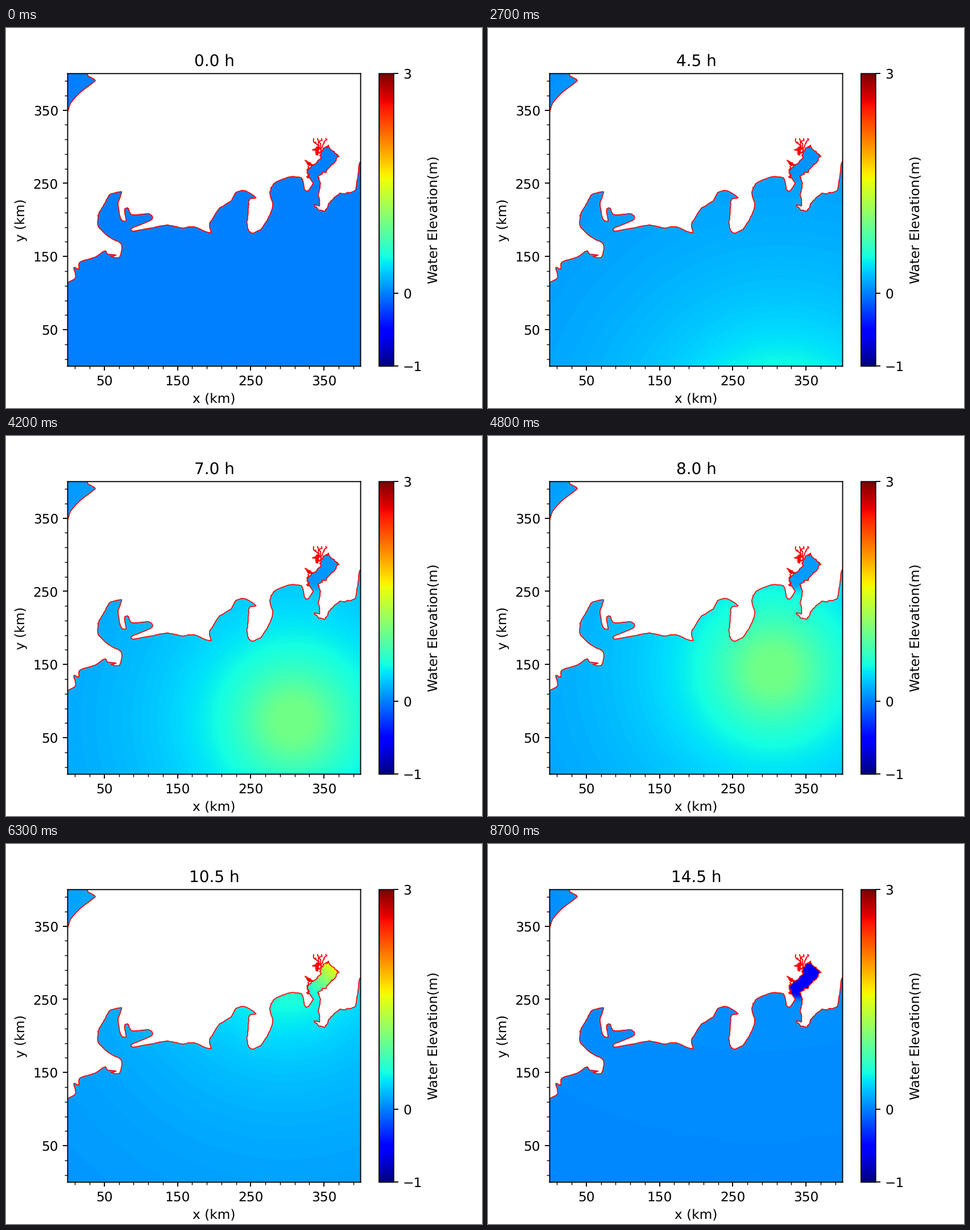
Animation of 837 by 669 pixels, one loop 9000 ms. Source, as a matplotlib script:

```python
import numpy as np
import matplotlib.pyplot as plt
from matplotlib.animation import FuncAnimation
from matplotlib.patches import Polygon
from matplotlib.ticker import AutoMinorLocator

W, H, DPI = 837, 669, 167.3
FRAMES, STEP_MS = 30, 300
plt.rcParams.update({"path.snap": False, "text.hinting": "none"})
rng = np.random.default_rng(4)

# Key points of the coast in stage pixels, joined by smooth curves
WEST = [(90, 457), (122, 440), (119, 422), (128, 424), (130, 412), (157, 403),
        (174, 392), (179, 398), (194, 400), (185, 402), (199, 404), (203, 381),
        (180, 367), (162, 349), (163, 327), (174, 308), (183, 293), (203, 289),
        (197, 310), (202, 336), (211, 340), (208, 320), (214, 317), (222, 329),
        (251, 327), (257, 337), (221, 353), (223, 358)]
MIDDLE = [(250, 353), (284, 347), (310, 352), (330, 350), (360, 361), (358, 346),
          (374, 319), (396, 304), (404, 290), (420, 286), (440, 299), (428, 302),
          (426, 320), (424, 344), (427, 357), (434, 361), (449, 353), (462, 333),
          (469, 313), (464, 290), (472, 273), (498, 262), (520, 264), (526, 286),
          (533, 285), (540, 273)]
BAY = [(532, 264), (532, 248), (551, 231), (556, 214), (567, 210), (584, 226),
       (572, 242), (549, 264)]
EAST = [(553, 274), (550, 292), (551, 312), (543, 312), (550, 320), (562, 321),
        (569, 307), (587, 292), (613, 287), (618, 265), (624, 234), (640, 215)]
CORNER = [(640, 60), (170, 76), (157, 93), (130, 114), (114, 132), (108, 149),
          (90, 200)]


def km(points):
    p = np.asarray(points, float)
    return np.column_stack([p[:, 0] - 108.45, 595.4 - p[:, 1]]) / 1.2878


def curve(points, rough=0, parts=6):
    """Spline through the points, roughened by random offsets."""
    p = np.asarray(points, float)
    ext = np.vstack([p[:1], p, p[-1:]])
    slope = 0.35 * (ext[2:] - ext[:-2])
    u = (np.arange(parts) / parts)[None, :, None]
    a, b = p[:-1, None], p[1:, None]
    s, e = slope[:-1, None], slope[1:, None]
    ease_u = u * u * (3 - 2 * u)
    line = a + (b - a) * ease_u + s * u * (1 - u) ** 2 - e * u * u * (1 - u)
    line = np.vstack([line.reshape(-1, 2), p[-1:]])
    return line + rng.normal(0, 1, line.shape) * rough


def creek(start, end, n=14):
    """A meandering stream between two points."""
    u = np.linspace(0, 1, n)[:, None]
    walk = rng.normal(0, 1.1, (n, 2)).cumsum(axis=0)
    return np.array(start) * (1 - u) + np.array(end) * u + walk - u * walk[-1]


def scribble(x, y, sx, sy, n=30):
    return rng.normal((x, y), (sx, sy), (n, 2))


land = np.vstack([curve(WEST, 0.25), curve(MIDDLE, 0.3), curve(BAY, 1.4, 9),
                  curve(EAST, 0.6), curve(CORNER)])
streams = [creek((552 + k, 214), (541 + 7 * k, 195)) for k in range(4)]
streams += [scribble(547, 217, 2, 3.5), scribble(533, 239, 2.2, 2.2, 20),
            creek((533, 240), (526, 233), 8), creek((532, 264), (531, 244))]

X, Y = np.meshgrid(*[(np.arange(258) + 0.5) * 400 / 258] * 2)


def sigmoid(v):
    return 1 / (1 + np.exp(-np.clip(v, -40, 40)))


def ease(t, a, b):
    u = np.clip((t - a) / (b - a), 0, 1)
    return u * u * (3 - 2 * u)


def pulse(t, mid, width):
    return np.exp(-((t - mid) / width) ** 2)


BAY_MASK = (sigmoid((Y - 252) / 2.5) * sigmoid((X - 325) / 1.2)
            * sigmoid((382 - X) / 1.2))
BAY_AXIS = (X - 350 + Y - 278) / 34


def elevation(t):
    """Pressure dome of a storm moving north, plus surge and drain in the bay."""
    r = np.hypot(X - 308 + 3.2 * (t - 7), Y - 73 - 70 * (t - 7)) + 1e-6
    dome = 0.95 * (1 - np.exp(-(82 / r) ** 1.2))
    lag = max(0, 1 - t / 5) * np.clip((r - 250) / 250, 0, 1)
    sea = dome * (1 - lag) * min(1, t / 2) * (1 - 0.5 * ease(t, 8.5, 13.5))
    bay = 0.1 * ease(t, 2, 5.5) + pulse(t, 10.7, 1.4) - 0.67 * ease(t, 11.5, 14)
    bay = bay + 0.6 * BAY_AXIS * pulse(t, 10.8, 0.9)
    return sea + (bay - sea) * BAY_MASK


fig, ax = plt.subplots(figsize=((W + 0.001) / DPI, (H + 0.001) / DPI), dpi=DPI)
im = ax.imshow(elevation(0), origin="lower", extent=(0, 400, 0, 400),
               cmap="jet", vmin=-1, vmax=3, interpolation="bilinear")
ax.add_patch(Polygon(km(land), fc="white", ec="red", lw=0.7, zorder=1.5))
for stream in streams:
    ax.plot(*km(stream).T, color="red", lw=0.8, zorder=1.6)

ax.set(xlim=(0, 400), ylim=(0, 400),
       xticks=range(50, 400, 100), yticks=range(50, 400, 100))
ax.set_xlabel("x (km)", labelpad=3.8)
ax.set_ylabel("y (km)")
for axis in (ax.xaxis, ax.yaxis):
    axis.set_minor_locator(AutoMinorLocator(5))
title = ax.set_title("0.0 h", pad=5.7)
fig.colorbar(im, ax=ax, ticks=[-1, 0, 3], label="Water Elevation(m)")


def draw(i):
    t = i / 2
    im.set_data(elevation(t))
    title.set_text(f"{t:.1f} h")
    return im, title


anim = FuncAnimation(fig, draw, frames=FRAMES, interval=STEP_MS, repeat=True)
plt.show()
```
